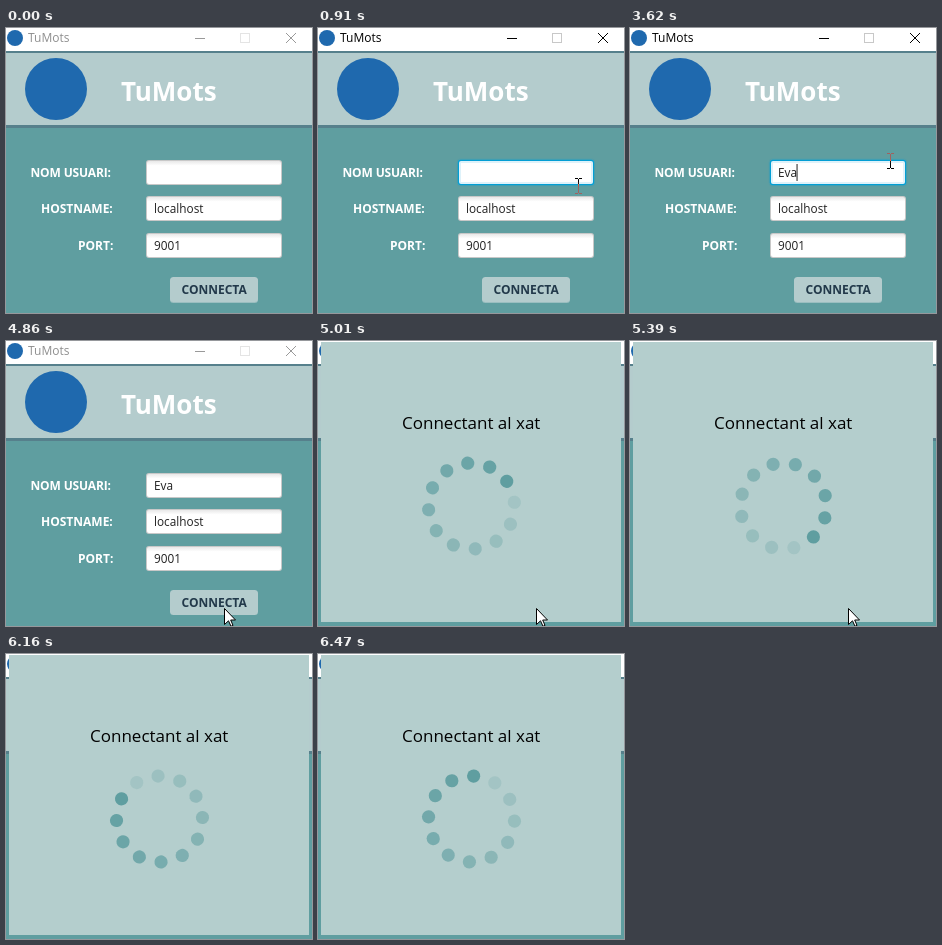
Animation of 306x285 px, one loop 6.55 s. Source, as an HTML page:

```html
<!DOCTYPE html>
<html lang="ca">
<head>
<meta charset="utf-8">
<title>TuMots</title>
<style>
  html, body { margin: 0; width: 100%; height: 100%; overflow: hidden; background: #5f9ea0; }
  svg { display: block; width: 306px; height: 285px; }
  text { font-family: "Open Sans", "Noto Sans", sans-serif; font-size: 12px; }
  .bold { font-weight: 700; fill: #fff; }
  .entry { font-size: 11.8px; fill: #222; }
  .icon { fill: none; stroke: #999; shape-rendering: crispEdges; }
  .cross { shape-rendering: auto; }
  #caption { fill: #8f8f8f; }
  .active #caption { fill: #000; }
  .active .icon { stroke: #000; }
  .icon.off { stroke: #e4e4e4; }
  .active .icon.off { stroke: #c8c8c8; }
  .border { fill: #c8c8c8; }
  #ring { visibility: hidden; }
  .focus #ring { visibility: visible; }
  .pressed #edge { visibility: hidden; }
  #beam { fill: none; stroke: #fff; mix-blend-mode: difference; shape-rendering: crispEdges; }
</style>
</head>
<body>
<svg id="stage" viewBox="0 0 306 285">
  <defs>
    <linearGradient id="paper" x2="0" y2="1">
      <stop stop-color="#e8e8e8"/>
      <stop offset=".2" stop-color="#fff"/>
    </linearGradient>
  </defs>
  <rect width="306" height="285" fill="#5f9ea0"/>

  <!-- title bar -->
  <rect width="306" height="23" fill="#fff"/>
  <circle cx="9" cy="10" r="8" fill="#1f69ae"/>
  <text id="caption" x="22" y="14">TuMots</text>
  <path class="icon" d="M189 10.5h10"/>
  <rect class="icon off" x="234.5" y="5.5" width="9" height="9"/>
  <path class="icon cross" d="M280 5l10 10M290 5l-10 10"/>

  <!-- banner -->
  <rect y="23" width="306" height="77" fill="#56808c"/>
  <rect y="25" width="306" height="72" fill="#b4cccd"/>
  <circle cx="50" cy="61" r="31" fill="#1f69ae"/>
  <text class="bold" x="115" y="73" style="font-size:26px">TuMots</text>

  <!-- form -->
  <text class="bold" x="24.5" y="149" letter-spacing="-.15">NOM USUARI:</text>
  <text class="bold" x="35" y="185">HOSTNAME:</text>
  <text class="bold" x="72" y="222">PORT:</text>
  <g id="fields"></g>
  <g id="ring">
    <rect x="139.8" y="131.8" width="136.4" height="25.4" rx="3" fill="#039ed3"/>
    <rect x="141" y="133" width="134" height="23" rx="2" fill="#fff"/>
    <rect x="138.6" y="130.6" width="138.8" height="27.8" rx="4" fill="#039ed3" fill-opacity=".13"/>
    <rect x="143" y="135" width="130" height="19" fill="#fff"/>
  </g>
  <text class="entry" id="name" x="148" y="149"></text>
  <text class="entry" x="148" y="185">localhost</text>
  <text class="entry" x="148" y="222">9001</text>
  <rect id="caret" y="136" width="1" height="17" fill="#222"/>
  <rect id="edge" x="164" y="250" width="88" height="25" rx="3.5" fill="#b4cccd" fill-opacity=".7"/>
  <rect x="164" y="249" width="88" height="25" rx="3.5" fill="#b4cccd"/>
  <text class="bold" x="175.5" y="266" style="fill:#22394a">CONNECTA</text>

  <!-- waiting dialog -->
  <g id="dialog">
    <rect x="3" y="1" width="300" height="280" fill="#b4cecd"/>
    <text x="84" y="88" style="font-size:17px">Connectant al xat</text>
    <g id="spinner" fill="#5f9ea0"></g>
  </g>

  <path id="beam" d="M-3 -7.5h3m1 0h3M.5 -7v14M-3 7.5h3m1 0h3"/>
  <path id="arrow" fill="#fff" stroke="#000" stroke-linejoin="round"
        d="M.5 .5V16.5L4.5 12.8 7 18.3 9 17.4 6.7 12H11.5z"/>
</svg>
<script>
  const LOOP = 6550, STEP = 76;
  const FOCUS = 830, CLICK = 1060, PRESS = 4630, BLUR = 4860, WAIT = 5010;
  const $ = id => document.getElementById(id);
  const show = (el, on) => { el.style.display = on ? '' : 'none'; };
  const between = (t, a, b) => t >= a && t < b;
  const smooth = p => p * p * (3 - 2 * p);
  const stepsSince = (t, at) => Math.floor((t - at) / STEP);

  const rows = [132, 168, 205];
  $('fields').innerHTML = rows.map(y =>
    `<rect class="border" x="140" y="${y}" width="136" height="25" rx="3"/>
     <rect x="141" y="${y + 1}" width="134" height="23" rx="2" fill="url(#paper)"/>`).join('');

  const DOTS = 12;
  for (let i = 0; i < DOTS; i++) {
    const a = -i * 2 * Math.PI / DOTS;
    $('spinner').innerHTML += `<circle cx="${43 * Math.cos(a)}" cy="${43 * Math.sin(a)}" r="6.6"
      opacity="${1 - .8 * i / (DOTS - 1)}"/>`;
  }

  // each move eases from the previous resting place
  const moves = [
    { at: 210, steps: 6, to: [260, 158] },
    { at: CLICK, steps: 3, to: [260, 133] },
    { at: 3850, steps: 9, to: [218, 267] },
    { at: 5700, steps: 2, to: [264, 288] }
  ];

  function pointerAt(t) {
    return moves.filter(m => m.at <= t).reduce((from, { at, steps, to }) => {
      const p = smooth(Math.min(1, (stepsSince(t, at) + 1) / steps));
      return from.map((v, i) => Math.round(v + (to[i] - v) * p));
    }, [268, 285]);
  }

  function drawPointer(t) {
    const [x, y] = pointerAt(t);
    const overField = t < WAIT && rows.some(top => between(y, top - 1, top + 27));
    show($('beam'), overField);
    show($('arrow'), !overField);
    for (const id of ['beam', 'arrow']) $(id).setAttribute('transform', `translate(${x} ${y})`);
  }

  const NAME = 'Eva';
  const keys = [2150, 2530, 2610];

  function drawName(t) {
    const hit = keys.filter(at => at <= t);
    const text = NAME.slice(0, hit.length);
    $('name').textContent = text;
    const width = text && $('name').getComputedTextLength();
    // every key restarts the blink
    const idle = t - (hit.pop() || CLICK);
    const lit = Math.floor((idle + 85) / 545) % 2 === 0;
    show($('caret'), lit && between(t, CLICK, PRESS));
    $('caret').setAttribute('x', 147.5 + width);
  }

  function render(t) {
    const stage = $('stage').classList;
    stage.toggle('active', between(t, FOCUS, BLUR));
    stage.toggle('focus', between(t, FOCUS, PRESS));
    stage.toggle('pressed', t >= PRESS);
    show($('dialog'), t >= WAIT);
    const turn = 16.2 * stepsSince(t, WAIT) - 35;
    $('spinner').setAttribute('transform', `translate(153.5 165) rotate(${turn})`);
    drawName(t);
    drawPointer(t);
  }

  const start = performance.now();
  function frame() {
    render((performance.now() - start) % LOOP);
    requestAnimationFrame(frame);
  }
  frame();
</script>
</body>
</html>
```
